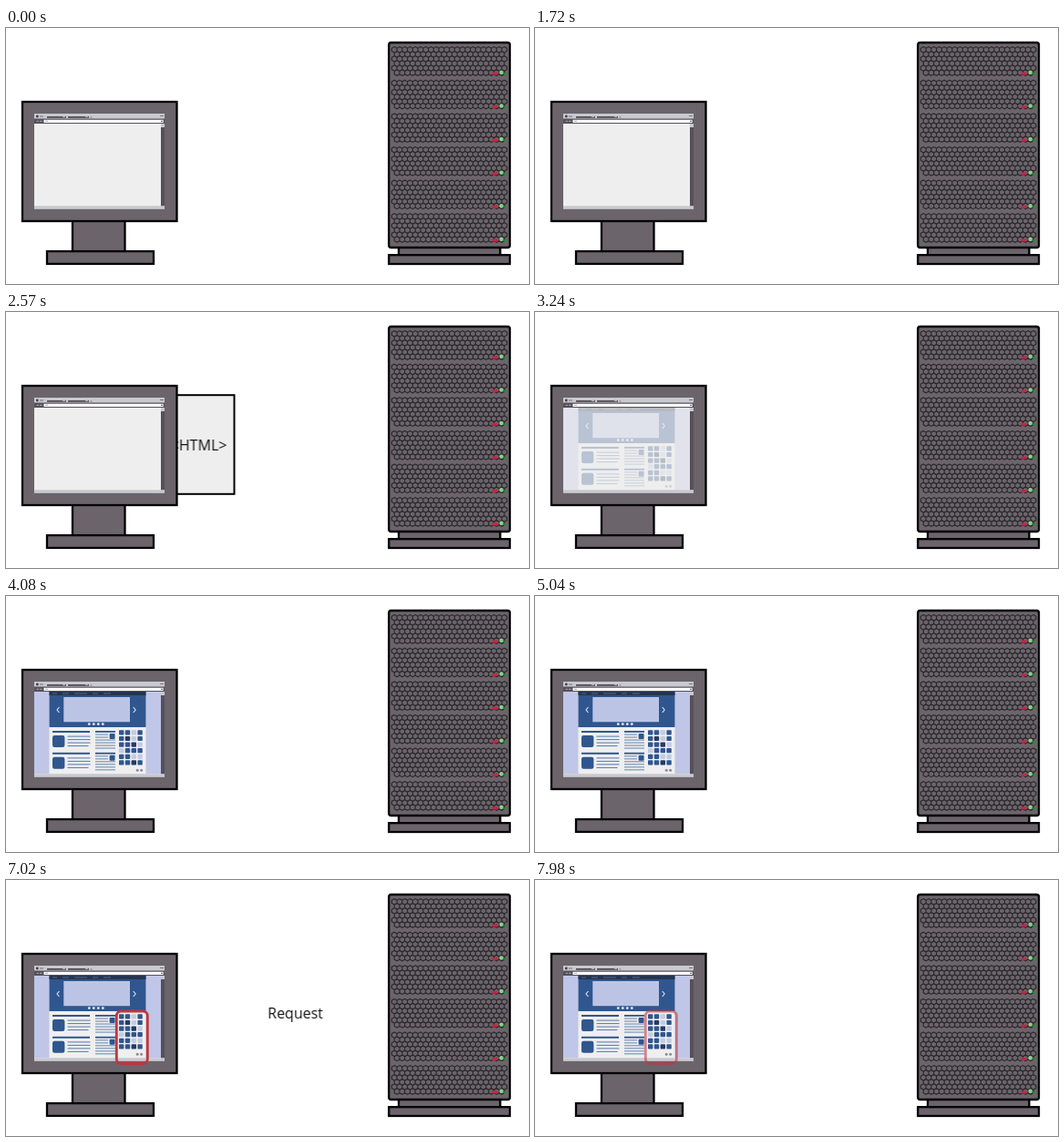
These frames come from a looping animation (574 by 281 pixels, 8 s). An HTML page:

```html
<!DOCTYPE html>
<html lang="en">
<head>
<meta charset="utf-8">
<title>Page request</title>
<style>
  html, body { margin: 0; width: 100%; height: 100%; overflow: hidden; background: #fff; }
  svg { display: block; width: 574px; height: 281px; }
  text { font: 16px "Open Sans", "Noto Sans", sans-serif; fill: #111; }
  .case { fill: #6b646b; stroke: #000; stroke-width: 2.3; }
  .request { animation: request 8s infinite; }
  .sheet { animation: sheet 8s infinite; }
  .page { animation: page 8s infinite; }
  .mark { animation: mark 8s linear infinite; }

  @keyframes request {
    0%, 8% { transform: translateX(125px); animation-timing-function: cubic-bezier(.333, 0, .667, .333); }
    21.5% { transform: translateX(420px); animation-timing-function: step-end; }
    30%, 77.75% { transform: translateX(125px); animation-timing-function: cubic-bezier(.333, 0, .667, .333); }
    91.25%, 100% { transform: translateX(420px); }
  }
  @keyframes sheet {
    0%, 23.875% { transform: translateX(421px); animation-timing-function: cubic-bezier(.333, .406, .667, .74); }
    35.125%, 100% { transform: translateX(100px); }
  }
  @keyframes page {
    0%, 36.9% { opacity: 0; animation-timing-function: linear; }
    50%, 100% { opacity: 1; }
  }
  @keyframes mark {
    0%, 76% { opacity: 0; }
    81%, 97.1% { opacity: 1; }
    100% { opacity: .55; }
  }
</style>
</head>
<body>
<svg viewBox="0 0 574 281">
  <g class="request"><text y="152">Request</text></g>
  <g class="sheet">
    <rect x="1" y="91.2" width="78" height="108.6" fill="#eee" stroke="#000" stroke-width="2"/>
    <text x="40" y="152" text-anchor="middle">&lt;HTML&gt;</text>
  </g>

  <g class="case">
    <rect x="73" y="211" width="57.5" height="35"/>
    <rect x="45" y="245.1" width="117" height="13.8"/>
    <rect x="18" y="81" width="169.5" height="131"/>
  </g>
  <rect x="31" y="94" width="143" height="104.5" fill="#eee"/>

  <g class="page">
    <path fill="#c0c6e7" d="M31 105H170V195H31Z"/>
    <path fill="#efefef" d="M47.5 105H153.5V195H47.5Z"/>
    <path fill="#2f568f" d="M47.5 105H153.5V144H47.5Z"/>
    <path fill="#26334f" d="M47.5 105H153.5V109H47.5Z"/>
    <path stroke="#66738f" stroke-width=".8" d="M51 107h5m6 0h7m6 0h14m6 0h6m6 0h8"/>
    <path fill="#bcc4e5" d="M63.3 111H136V138.3H63.3Z"/>
    <path fill="none" stroke="#dfe5f5" stroke-width="1.1" d="M58.5 122l-2.5 3 2.5 3M139.7 122l2.5 3-2.5 3"/>
    <g id="dots" fill="#eef"></g>
    <g id="posts"></g>
    <g id="tiles"></g>
    <g fill="#8a8c96"><circle cx="144.2" cy="191.3" r="1.5"/><circle cx="148.6" cy="191.3" r="1.5"/></g>
  </g>

  <g id="browser">
    <path fill="#c9c9d0" d="M31 94H174V100H31ZM31 195.3H174V198.5H31Z"/>
    <path fill="#55505a" d="M31 99.6H174V105H31ZM170 105H174V195.3H170Z"/>
    <path fill="#fff" d="M41.5 100.8H172.7V104H41.5Z"/>
    <path fill="#c9c9d0" d="M170 105h4v4h-4Z"/>
    <path stroke="#4d4952" stroke-width="1.8" d="M45 97.8H66M68 97.8H91"/>
    <path stroke="#aaa9b0" stroke-width="1" d="M62 97.6h3M87 97.6h3M33.5 102.3h2.5M37 102.3h2.5M43 102.3h3"/>
    <path stroke="#777480" stroke-width="1.2" d="M37 97h4M92.5 98h2M169 96.5h4M170 102.4h2"/>
    <circle cx="34.3" cy="97" r="1.4" fill="#44404a"/>
  </g>

  <rect class="mark" x="121.3" y="144" width="34" height="57.5" rx="5" fill="none" stroke="#c1353c" stroke-width="2.8"/>

  <g class="case">
    <rect x="431" y="240" width="111.4" height="10"/>
    <rect x="420.2" y="249.2" width="132.8" height="9.8"/>
    <rect x="420.2" y="16" width="132.8" height="225" rx="2.6"/>
  </g>
  <path id="mesh" fill="#6b646b" stroke="#29262a" stroke-width="1.1"/>
  <g id="leds"></g>
</svg>
<script>
  const $ = id => document.getElementById(id);
  const box = (x, y, w, h, fill, r = 0) =>
    `<rect x="${x}" y="${y}" width="${w}" height="${h}" rx="${r}" fill="${fill}"/>`;
  const dot = (x, y, r, fill) => `<circle cx="${x}" cy="${y}" r="${r}" fill="${fill}"/>`;
  const blue = '#2f568f', line = '#5577a6';

  $('dots').innerHTML = [91.3, 96.3, 101.3, 106.3].map(x => dot(x, 140.6, 1.4, '#e8ecf8')).join('');

  let posts = '';
  for (const y of [148, 171.8]) {
    posts += box(51, y, 41, 2, blue) + box(98, y, 22, 1.8, blue);
    posts += box(51, y + 5, 13.4, 13, blue, 2.2) + box(113.6, y + 3, 6, 6, blue, 1);
    for (let i = 0; i < 4; i++) posts += box(67.5, y + 5.6 + i * 3.5, i == 3 ? 23 : 25, 1, line);
    for (let i = 0; i < 6; i++) posts += box(98, y + 3.6 + i * 3, i < 2 ? 14 : 22, .9, line);
  }
  $('posts').innerHTML = posts;

  const shades = { d: '#253a63', b: blue, l: '#c3cbe4' };
  $('tiles').innerHTML = [...'bblbbdlbbbdllbbbbbllbbdb'].map((c, i) =>
    box(124 + i % 4 * 6.8, 147.3 + (i >> 2) * 6.6, 5.4, 5.2, shades[c], .8)).join('');

  // Honeycomb grilles, six units high
  const hexW = 5.75, hexR = 3.2;
  const hex = (x, y) =>
    `M${x} ${y - hexR}l${hexW / 2} ${hexR / 2}v${hexR}l${-hexW / 2} ${hexR / 2}l${-hexW / 2} ${-hexR / 2}v${-hexR}Z`;
  let mesh = '', leds = '';
  for (let unit = 0; unit < 6; unit++) {
    const top = 20.6 + unit * 36.6;
    for (let row = 0; row < 6; row++)
      for (let col = 0; col < 22 - row % 2; col++)
        mesh += hex(426.2 + (col + row % 2 / 2) * hexW, top + hexR + row * 5.05);
    leds += box(533.5, top + 28, 6, 3, '#cf2142', 1.4) +
      dot(543.6, top + 28.2, 2.2, '#8fd08c') + dot(548, top + 29.8, 1.7, '#2c8a3c');
  }
  $('mesh').setAttribute('d', mesh);
  $('leds').innerHTML = leds;
</script>
</body>
</html>
```
